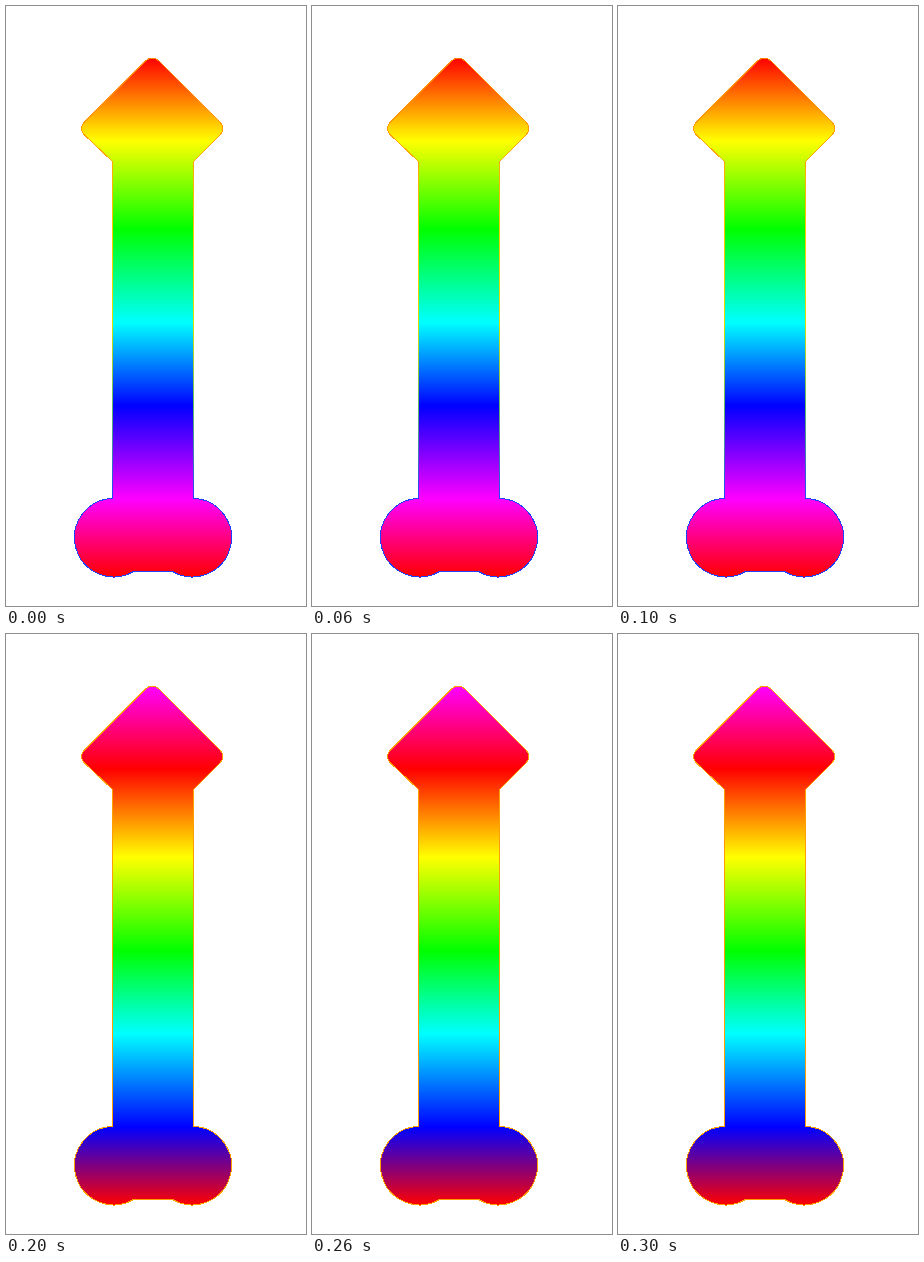
Recreate the animation shown at these times as an HTML page. Size 300 by 600 pixels, loop 0.4 s.

```html
<!DOCTYPE html>
<html lang="en">
<head>
<meta charset="utf-8">
<title>Rainbow shape</title>
<style>
  html, body { margin: 0; width: 100%; height: 100%; overflow: hidden; background: #fff; }
  svg { display: block; width: 300px; height: 600px; }
</style>
</head>
<body>
<svg id="stage" viewBox="0 0 300 600" shape-rendering="crispEdges">
  <defs>
    <path id="shape" d="M140.2 54.5 A8.5 8.5 0 0 1 152.2 54.5 L214.3 116.5
      A8.5 8.5 0 0 1 214.3 128.5 L187.5 155.5 V492.5
      A39.2 39.2 0 1 1 166.5 565.5 H127.5
      A39.2 39.2 0 1 1 106.5 492.5 V155.5 L78 128.5
      A8.5 8.5 0 0 1 78 116.5 Z"/>
  </defs>
</svg>
<script>
const TOP = 52, BOTTOM = 571, LOOP = 400;
const STOPS = [0, 0.16, 0.33, 0.51, 0.67, 0.85, 1];
const PHASES = [
  {
    fill: ['#f00', '#ff0', '#0f0', '#0ff', '#00f', '#f0f', '#f00'],
    line: ['#ff8000', '#ffa000', '#ffc800', '#e0e000', '#60c060', '#2040ff', '#2040ff'],
    opacity: [1, 0]
  },
  {
    fill: ['#f0f', '#f00', '#ff0', '#0f0', '#0ff', '#00f', '#f00'],
    line: Array(7).fill('#ffa000'),
    opacity: [0, 1]
  }
];

const stage = document.getElementById('stage');
const defs = stage.querySelector('defs');

function add(parent, tag, attrs) {
  const el = document.createElementNS('http://www.w3.org/2000/svg', tag);
  for (const key in attrs) el.setAttribute(key, attrs[key]);
  return parent.appendChild(el);
}

function gradient(id, colors) {
  const el = add(defs, 'linearGradient', {
    id, gradientUnits: 'userSpaceOnUse', x1: 0, y1: TOP, x2: 0, y2: BOTTOM
  });
  colors.forEach((color, i) => add(el, 'stop', { offset: STOPS[i], 'stop-color': color }));
  return `url(#${id})`;
}

PHASES.forEach(({ fill, line, opacity: [first, second] }, i) => {
  const layer = add(stage, 'use', {
    href: '#shape',
    fill: gradient(`fill${i}`, fill),
    stroke: gradient(`line${i}`, line),
    'stroke-width': 1
  });
  const animation = layer.animate([
    { opacity: first, offset: 0 },
    { opacity: first, offset: 0.5 },
    { opacity: second, offset: 0.5 },
    { opacity: second, offset: 1 }
  ], { duration: LOOP, iterations: Infinity });
  animation.startTime = 0;
  animation.startTime = document.timeline.currentTime;
});
</script>
</body>
</html>
```
